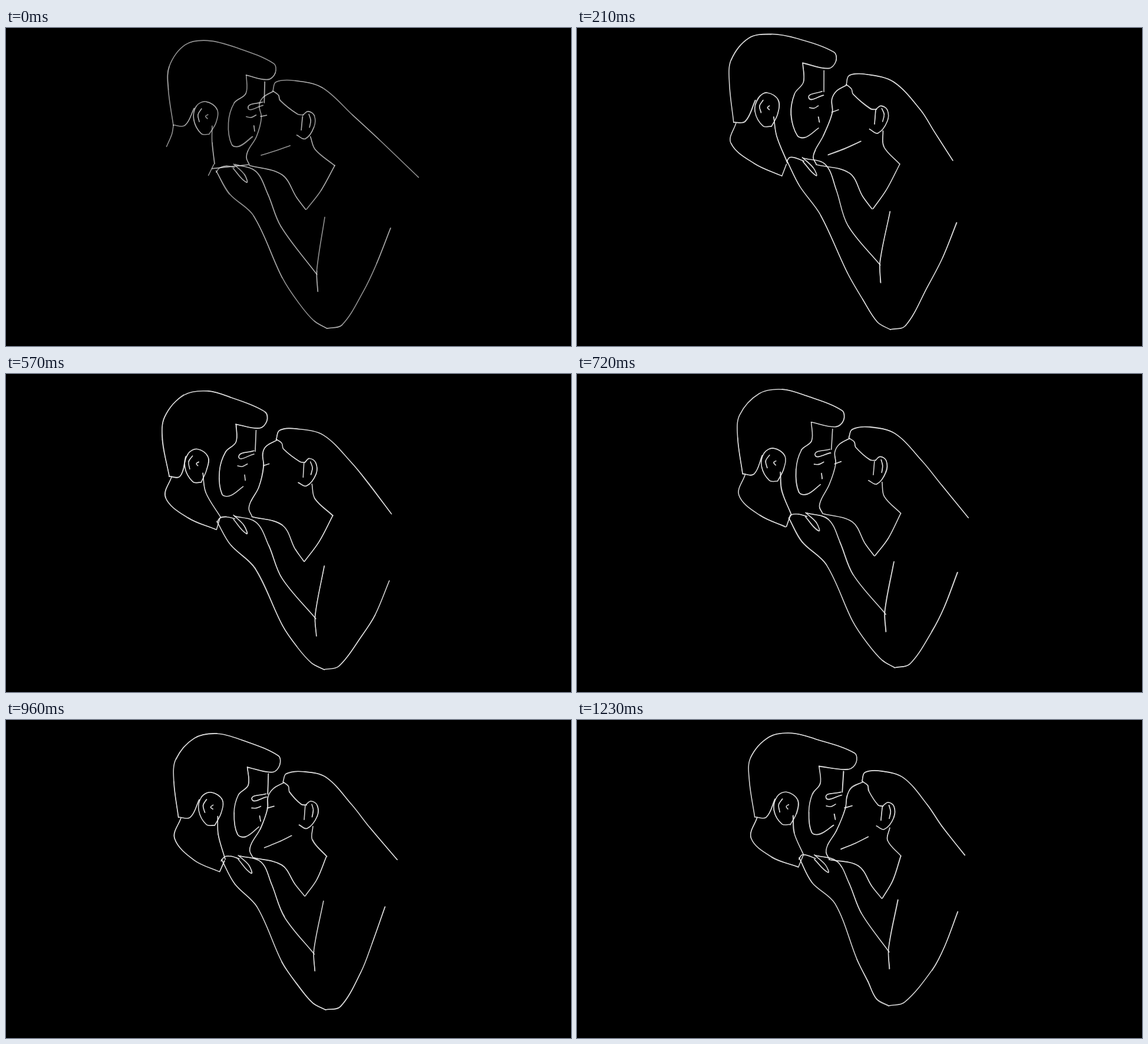
An HTML page with a canvas that plays this animation: 959 px wide and 540 px high, repeating every 1.26 s.

```html
<!DOCTYPE html>
<html lang="en">
<head>
<meta charset="utf-8">
<title>Line drawing of a kiss</title>
<style>
html, body { margin: 0; width: 100%; height: 100%; overflow: hidden; background: #000; }
canvas { display: block; width: 959px; height: 540px; }
</style>
</head>
<body>
<canvas id="stage" width="959" height="540"></canvas>
<script>
const LOOP = 1260, STEP = 30, REST = 4;
const times = [0, 210, 390, 570, 870, 1080, 1230];
const ctx = document.getElementById('stage').getContext('2d');
const joints = { man: [], woman: [], arm: [] };
const strokes = [];

const pairs = text => text.split(', ').map(p => p.split(' ').map(Number));
const joint = (group, path) => joints[group].push(pairs(path));
const stroke = (group, path, shown = () => true) =>
  strokes.push({ group, pts: pairs(path), shown });

// Joints: one place per key pose. The lines around them follow.
joint('man', '284 165, 266 160, 267 171, 277 174, 286 166, 302 164, 302 165');
joint('man', '342 21, 330 10, 330 22, 342 29, 355 24, 364 23, 365 22');
joint('man', '457 76, 439 57, 438 66, 443 80, 463 76, 467 77, 474 72');
joint('man', '408 80, 383 60, 379 73, 390 85, 405 79, 417 81, 411 78');
joint('man', '397 201, 388 186, 380 200, 380 207, 402 200, 415 194, 413 194');
joint('man', '338 153, 322 138, 318 148, 322 155, 343 152, 352 149, 354 150');
joint('man', '343 250, 347 251, 346 268, 356 264, 353 254, 373 263, 375 250');
joint('woman', '453 107, 457 96, 465 104, 459 111, 465 106, 478 105, 484 104');
joint('woman', '700 254, 638 225, 674 243, 654 237, 674 250, 650 220, 658 230');
joint('woman', '510 165, 514 155, 524 165, 513 167, 511 160, 520 162, 525 163');
joint('woman', '411 208, 404 207, 420 205, 415 217, 414 207, 421 212, 426 212');
joint('woman', '558 233, 548 231, 552 241, 555 240, 544 234, 544 229, 550 231');
joint('woman', '510 308, 502 307, 511 316, 507 318, 505 300, 512 298, 518 303');
joint('arm', '357 243, 356 225, 357 243, 358 250, 361 238, 372 236, 377 234');
joint('arm', '388 231, 385 220, 388 235, 388 240, 392 231, 402 228, 405 229');
joint('arm', '434 348, 427 348, 434 358, 436 360, 438 348, 443 348, 452 342');
joint('arm', '545 510, 532 512, 545 520, 540 502, 540 495, 545 489, 530 485');
joint('arm', '653 340, 645 331, 653 341, 651 351, 642 323, 644 310, 646 325');
joint('arm', '528 419, 515 403, 527 425, 526 416, 522 401, 525 393, 530 394');

const early = t => t < 105, later = t => !early(t);

// Man: hair, face, ear, neck
stroke('man', '286 166, 279 105, 283 67, 316 31, 355 24, 396 34, 460 60, 463 76, 450 88, 405 79');
stroke('man', '405 79, 406 110, 390 127, 382 160, 388 197, 402 200, 424 184');
stroke('man', '443 91, 441 126');
stroke('man', '438 125, 413 135, 439 131');
stroke('man', '412 150, 420 151, 428 147');
stroke('man', '425 165, 427 174');
stroke('man', '350 180, 336 179, 323 155, 328 132, 344 124, 363 137, 361 160, 350 180');
stroke('man', '333 158, 331 146, 337 136');
stroke('man', '348 146, 344 149, 347 153');
stroke('man', '286 166, 306 166, 324 136');
stroke('man', '290 167, 280 202, 312 236, 353 254', later);
stroke('man', '286 166, 284 181, 275 202', early);
stroke('man', '355 165, 355 195, 364 234');
stroke('man', '354 254, 362 235');
stroke('man', '360 242, 417 232', early);

// Woman: profile, hair, ear, neck
stroke('woman', '466 107, 448 117, 440 130, 440 150, 428 183, 414 207, 411 220, 416 231');
stroke('woman', '465 106, 470 91, 500 88, 540 98, 585 145, 620 188, 674 250');
stroke('woman', '465 106, 474 113, 476 122, 497 142, 506 143');
stroke('woman', '505 143, 514 137, 524 144, 524 163, 508 183, 494 177');
stroke('woman', '504 145, 502 168');
stroke('woman', '515 142, 518 152, 516 164');
stroke('woman', '439 149, 450 146');
stroke('woman', '436 215, 460 206, 482 196', t => t < 480 || t > 720);
stroke('woman', '517 180, 518 205, 544 234');
stroke('woman', '544 234, 526 272, 505 300');
stroke('woman', '416 232, 466 246, 488 280, 504 300');

// Arm and hand
stroke('arm', '361 238, 384 279, 424 318, 467 413, 492 452, 518 483, 540 495');
stroke('arm', '540 495, 565 489, 601 431, 620 385, 642 323');
stroke('arm', '392 232, 428 242, 448 280, 470 335, 522 401');
stroke('arm', '537 310, 521 395, 523 430');
stroke('arm', '361 240, 366 233, 378 233, 392 237');
stroke('arm', '390 238, 412 261, 408 248, 390 231');

const mix = (a, b, k) => a + (b - a) * k;

function noise(...seeds) {
  const v = Math.sin(seeds.reduce((sum, s, i) => sum + s * (12.99 + i * 65.24), 1)) * 43758.55;
  return (v - Math.floor(v)) * 2 - 1;
}

// Shift a point by the moves of its joints, the nearest counting most.
function follow([x, y], moves) {
  let sx = 0, sy = 0, sum = 0;
  for (const m of moves) {
    const w = 1 / (Math.hypot(x - m.x, y - m.y) ** 3 + 20);
    sx += m.dx * w;
    sy += m.dy * w;
    sum += w;
  }
  return [x + sx / sum, y + sy / sum];
}

// Smooth curve through the points, with handles sized to each segment.
function trace(pts, from, to) {
  const dir = i => {
    const a = pts[Math.max(i - 1, 0)], b = pts[Math.min(i + 1, pts.length - 1)];
    const dx = b[0] - a[0], dy = b[1] - a[1], len = Math.hypot(dx, dy) || 1;
    return [dx / len, dy / len];
  };
  ctx.beginPath();
  ctx.moveTo(...pts[from]);
  for (let i = from; i < to; i++) {
    const p = pts[i], q = pts[i + 1], u = dir(i), v = dir(i + 1);
    const h = Math.hypot(q[0] - p[0], q[1] - p[1]) / 3;
    ctx.bezierCurveTo(p[0] + u[0] * h, p[1] + u[1] * h, q[0] - v[0] * h, q[1] - v[1] * h, ...q);
  }
  ctx.stroke();
}

function sketch(pts, id, step) {
  const wobble = size => pts.map(([x, y], i) =>
    [x + size * noise(id, i, step), y + size * noise(id, i, step, 3)]);
  const main = wobble(0.4), rough = wobble(1.3), last = pts.length - 1;
  ctx.lineWidth = 1.6;
  trace(main, 0, last);
  ctx.lineWidth = 0.8;
  for (let i = 0; i < last; i++)
    if (noise(id, i, step, 7) > -0.2) trace(rough, i, i + 1);
}

function draw(now) {
  const step = Math.floor(now % LOOP / STEP), t = step * STEP;
  let i = 0;
  while (i < times.length - 2 && t >= times[i + 1]) i++;
  const k = (t - times[i]) / (times[i + 1] - times[i]);
  const moves = {};
  for (const group in joints)
    moves[group] = joints[group].map(poses => {
      const [x, y] = poses[REST], a = poses[i], b = poses[i + 1];
      return { x, y, dx: mix(a[0], b[0], k) - x, dy: mix(a[1], b[1], k) - y };
    });
  ctx.fillStyle = '#000';
  ctx.fillRect(0, 0, 959, 540);
  ctx.strokeStyle = `rgba(235,235,235,${Math.min(0.9, mix(0.62, 0.9, t / times[1]))})`;
  strokes.forEach(({ group, pts, shown }, id) => {
    if (shown(t)) sketch(pts.map(p => follow(p, moves[group])), id, step);
  });
}

ctx.lineCap = ctx.lineJoin = 'round';
const start = performance.now();
function tick() {
  draw(performance.now() - start);
  requestAnimationFrame(tick);
}
tick();
</script>
</body>
</html>
```
